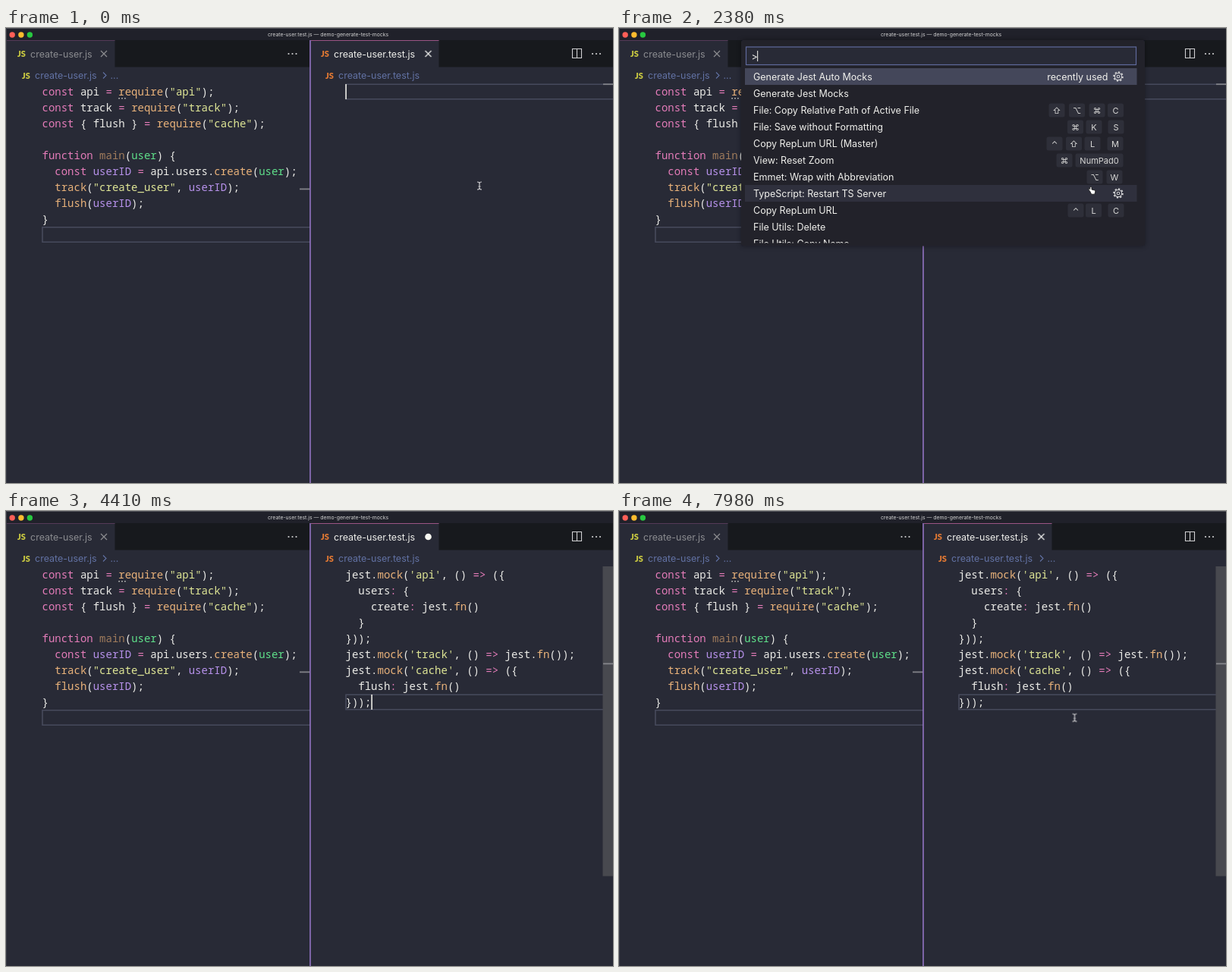
An HTML page for the animation above (8000 ms loop, 800x600 px).

```html
<!DOCTYPE html>
<html lang="en">
<head>
<meta charset="utf-8">
<title>Editor with command palette</title>
<style>
html, body { margin: 0; width: 100%; height: 100%; overflow: hidden; background: #282a36; }
svg { display: block; width: 800px; height: 600px; }
text { font: 12.5px Inter, "DejaVu Sans", sans-serif; fill: #f0f0ec; white-space: pre; }
.code text { font: 14px "Noto Sans Mono", "DejaVu Sans Mono", monospace; fill: #ecece8; }
.title text { font-size: 6.85px; text-anchor: middle; fill: #d4d4d4; }
text.js { font: 900 11px Lato, sans-serif; fill: #cbcb41; }
text.js.test { fill: #e37933; }
text.dim { fill: #8b8c90; }
text.crumb { fill: #6272a4; }
text.key { font-size: 11px; text-anchor: middle; fill: #d8d8d6; }
text.cyan { fill: #8be9fd; }
text.end { text-anchor: end; }
.p { fill: #e47cb9; }
.o { fill: #e9b27a; }
.y { fill: #e0e796; }
.v { fill: #b691ea; }
.g { fill: #5fe08a; }
.m { fill: #a07c5c; }
.line { fill: none; stroke: #474a5c; stroke-width: 1.6; }
.icon { fill: none; stroke: #d0d0d2; stroke-width: 1.1; }
.caret { fill: #d6d6d2; }

/* switches: hard on/off changes on the shared 8 s clock */
.before, .after, .palette, .first, .second, .beam, .hand,
.unsaved, .saved, .symbols, .caret { animation: 8s step-end infinite; }
.before { animation-name: before; }
.after { animation-name: after; }
.palette { animation-name: palette; }
.first { animation-name: first; }
.second { animation-name: second; }
.beam { animation-name: beam; }
.hand { animation-name: hand; }
.unsaved { animation-name: unsaved; }
.saved { animation-name: saved; }
.symbols { animation-name: symbols; }
.blink1 { animation-name: blink1; }
.blink2 { animation-name: blink2; }
.blink3 { animation-name: blink3; }
@keyframes before { 0% { opacity: 1 } 55.1%, 100% { opacity: 0 } }
@keyframes after { 0% { opacity: 0 } 55.1%, 100% { opacity: 1 } }
@keyframes palette { 0%, 55.1%, 100% { opacity: 0 } 29.7% { opacity: 1 } }
@keyframes first { 0% { opacity: 1 } 52.45%, 100% { opacity: 0 } }
@keyframes second { 0% { opacity: 0 } 52.45%, 100% { opacity: 1 } }
@keyframes beam { 0%, 77.85%, 100% { opacity: 1 } 29.7% { opacity: 0 } }
@keyframes hand { 0%, 52.45%, 100% { opacity: 0 } 29.7% { opacity: 1 } }
@keyframes unsaved { 0%, 64.7%, 100% { opacity: 0 } 55.1% { opacity: 1 } }
@keyframes saved { 0%, 64.7%, 100% { opacity: 1 } 55.1% { opacity: 0 } }
@keyframes symbols { 0% { opacity: 0 } 64.7%, 100% { opacity: 1 } }
@keyframes blink1 { 0%, 9.2%, 21.7% { opacity: 1 } 3%, 15.45%, 28%, 100% { opacity: 0 } }
@keyframes blink2 { 0%, 42% { opacity: 1 } 35.8%, 48.1%, 100% { opacity: 0 } }
@keyframes blink3 { 0%, 67.6%, 80.1%, 92.6% { opacity: 1 } 61.35%, 73.85%, 86.35%, 98.85%, 100% { opacity: 0 } }

.mouse { animation: mouse 8s linear infinite; }
@keyframes mouse {
  0%, .875% { transform: translate(624px, 208px); }
  5.25%, 77.875% { transform: translate(622px, 210px); animation-timing-function: ease-in; }
  82.25% { transform: translate(614px, 264px); animation-timing-function: ease-out; }
  87.5%, 91% { transform: translate(604px, 270.5px); }
  99.75%, 100% { transform: translate(600.5px, 272.5px); }
}
</style>
</head>
<body>
<svg viewBox="0 0 800 600" xmlns="http://www.w3.org/2000/svg">
  <defs>
    <g id="gear" class="icon">
      <circle r="4.6"/><circle r="1.8"/>
      <circle r="5.9" stroke-width="1.8" pathLength="16" stroke-dasharray="1 1"/>
    </g>
    <g id="dots" fill="#d0d0d2"><circle cx="-5" r="1.1"/><circle r="1.1"/><circle cx="5" r="1.1"/></g>
    <path id="cross" d="M-4-4L4 4M4-4L-4 4" fill="none" stroke-width="1.2"/>
    <path id="chevron" d="M-2-4L2 0L-2 4" fill="none" stroke="#6272a4" stroke-width="1.1"/>
    <clipPath id="list"><rect x="161" y="53" width="532" height="230.5"/></clipPath>
    <filter id="shadow" x="-10%" y="-10%" width="120%" height="120%">
      <feDropShadow dx="0" dy="0" stdDeviation="3" flood-color="#000" flood-opacity=".4"/>
    </filter>
  </defs>

  <rect width="800" height="600" fill="#282a36"/>

  <g class="title">
    <rect width="800" height="16" fill="#20212a"/>
    <rect width="800" height="1" fill="#505158"/>
    <circle cx="8.2" cy="9" r="3.7" fill="#ff5f57"/>
    <circle cx="19.9" cy="9" r="3.7" fill="#febc2e"/>
    <circle cx="31.4" cy="9" r="3.7" fill="#28c840"/>
    <text x="424.5" y="11.3">create-user.test.js — demo-generate-test-mocks</text>
  </g>

  <!-- tabs -->
  <rect x="143.5" y="16" width="257" height="35.5" fill="#17191d"/>
  <rect x="570.5" y="16" width="230" height="35.5" fill="#17191d"/>
  <rect y="16" width="143.5" height="1" fill="#553a58"/>
  <rect x="402" y="16" width="168.5" height="1" fill="#9a5585"/>
  <text class="js" x="15" y="38">JS</text>
  <text class="dim" x="32" y="38.5">create-user.js</text>
  <use href="#cross" x="129" y="34" stroke="#8b8c90"/>
  <use href="#dots" x="377.5" y="34"/>
  <text class="js test" x="415" y="38">JS</text>
  <text x="432" y="38.5">create-user.test.js</text>
  <use class="saved" href="#cross" x="556.5" y="34" stroke="#f0f0ee"/>
  <circle class="unsaved" cx="556.5" cy="34" r="4.3" fill="#f8f8f2"/>
  <path class="icon" d="M746.5 27.5h12v12h-12zM752.5 27.5v12"/>
  <use href="#dots" x="778" y="34"/>

  <!-- breadcrumbs -->
  <text class="js" x="21" y="66.5">JS</text>
  <text class="crumb" x="38" y="67">create-user.js</text>
  <use href="#chevron" x="130" y="62.5"/>
  <text class="crumb" x="137.5" y="67">...</text>
  <text class="js test" x="421" y="66.5">JS</text>
  <text class="crumb" x="438" y="67">create-user.test.js</text>
  <g class="symbols">
    <use href="#chevron" x="557" y="62.5"/>
    <text class="crumb" x="564.5" y="67">...</text>
  </g>

  <!-- left editor -->
  <path class="line" d="M401 262.8H48V282.3H401"/>
  <rect x="387" y="211.5" width="13.5" height="1.8" fill="#818288"/>
  <g class="code">
    <text x="47.5" y="89"><tspan class="p">const</tspan> api <tspan class="p">=</tspan> <tspan class="o">require</tspan>(<tspan class="y">"api"</tspan>);</text>
    <text x="47.5" y="110"><tspan class="p">const</tspan> track <tspan class="p">=</tspan> <tspan class="o">require</tspan>(<tspan class="y">"track"</tspan>);</text>
    <text x="47.5" y="131"><tspan class="p">const</tspan> { flush } <tspan class="p">=</tspan> <tspan class="o">require</tspan>(<tspan class="y">"cache"</tspan>);</text>
    <text x="47.5" y="173"><tspan class="p">function</tspan> <tspan class="m">main</tspan>(<tspan class="g">user</tspan>) {</text>
    <text x="64.3" y="194"><tspan class="p">const</tspan> <tspan class="v">userID</tspan> <tspan class="p">=</tspan> api.users.<tspan class="o">create</tspan>(<tspan class="g">user</tspan>);</text>
    <text x="64.3" y="215"><tspan class="o">track</tspan>(<tspan class="y">"create_user"</tspan>, <tspan class="v">userID</tspan>);</text>
    <text x="64.3" y="236"><tspan class="o">flush</tspan>(<tspan class="v">userID</tspan>);</text>
    <text x="47.5" y="257">}</text>
  </g>
  <path d="M148.3 92.7h10" stroke="#c4c4c0" stroke-width="1.6" stroke-dasharray="1.6 2.3"/>

  <!-- right editor, empty -->
  <g class="before">
    <path class="line" d="M801 74.2H448V93.7H801"/>
    <rect x="787" y="73.3" width="13" height="1.8" fill="#818288"/>
    <rect class="caret blink1" x="447.2" y="74" width="1.8" height="20"/>
  </g>

  <!-- right editor, generated mocks -->
  <g class="after">
    <path class="line" d="M801 242.2H448V261.7H801"/>
    <rect x="786.5" y="73" width="13.5" height="408.5" fill="#48494f"/>
    <rect x="787" y="200.5" width="13" height="1.8" fill="#85868b"/>
    <g class="code">
      <text x="447.5" y="89">jest.<tspan class="o">mock</tspan>(<tspan class="y">'api'</tspan>, () <tspan class="p">=&gt;</tspan> ({</text>
      <text x="464.3" y="110">users<tspan class="p">:</tspan> {</text>
      <text x="481.1" y="131">create<tspan class="p">:</tspan> jest.<tspan class="o">fn</tspan>()</text>
      <text x="464.3" y="152">}</text>
      <text x="447.5" y="173">}));</text>
      <text x="447.5" y="194">jest.<tspan class="o">mock</tspan>(<tspan class="y">'track'</tspan>, () <tspan class="p">=&gt;</tspan> jest.<tspan class="o">fn</tspan>());</text>
      <text x="447.5" y="215">jest.<tspan class="o">mock</tspan>(<tspan class="y">'cache'</tspan>, () <tspan class="p">=&gt;</tspan> ({</text>
      <text x="464.3" y="236">flush<tspan class="p">:</tspan> jest.<tspan class="o">fn</tspan>()</text>
      <text x="447.5" y="257">}));</text>
    </g>
    <rect class="caret blink3" x="481.2" y="242" width="1.8" height="20"/>
  </g>

  <!-- pane divider and window edge -->
  <rect x="400.2" y="16" width="1.5" height="584" fill="#9a78cc"/>
  <rect width="1" height="600" fill="#3a3c47"/>

  <!-- command palette -->
  <g class="palette">
    <rect x="161" y="16" width="532" height="271.5" rx="3" fill="#21222c" filter="url(#shadow)"/>
    <rect x="167.5" y="25" width="514" height="23.5" fill="#282a36" stroke="#5f6a9c" stroke-width="1.2"/>
    <text x="174.5" y="42">&gt;</text>
    <rect class="caret blink2" x="182" y="30" width="1.2" height="14"/>
    <rect class="first" x="166" y="53" width="516.5" height="22" fill="#44475a"/>
    <rect class="second" x="166" y="75" width="516.5" height="22" fill="#44475a"/>
    <rect x="166" y="207" width="516.5" height="22" fill="#2f303d"/>
    <g id="rows" clip-path="url(#list)"></g>
    <g class="first">
      <text class="end" x="644.5" y="69">recently used</text>
      <use href="#gear" x="658" y="64"/>
    </g>
    <g class="second">
      <text class="end cyan" x="668.5" y="69">recently used</text>
      <use href="#gear" x="658" y="86"/>
      <rect x="677.5" y="53" width="10" height="20.5" fill="#4b4c55"/>
    </g>
    <use href="#gear" x="658" y="218"/>
  </g>

  <g class="mouse">
    <path class="beam" d="M-3-5Q0-5 0-3Q0-5 3-5M0-3V3M-3 5Q0 5 0 3Q0 5 3 5M-1.5 1H1.5" fill="none" stroke="#c9c9cc" stroke-width="1.2"/>
    <path class="hand" d="M-1.2 5.5L-2.8 3.5Q-3-.3-1.2 2.6V0Q0-1.4 1 0V3L5 4Q6 4.4 5.8 6L4.8 9.2H.6Z" fill="#fff" stroke="#111" stroke-width=".8"/>
  </g>
</svg>
<script>
// label, then key caps with their centres
const commands = [
  ["Generate Jest Auto Mocks"],
  ["Generate Jest Mocks"],
  ["File: Copy Relative Path of Active File", "⇧", 577, "⌥", 603.5, "⌘", 630, "C", 654.5],
  ["File: Save without Formatting", "⌘", 601.5, "K", 626, "S", 655],
  ["Copy RepLum URL (Master)", "⌃", 574, "⇧", 599.5, "L", 624, "M", 654],
  ["View: Reset Zoom", "⌘", 587, "NumPad0", 633],
  ["Emmet: Wrap with Abbreviation", "⌥", 627, "W", 653],
  ["TypeScript: Restart TS Server"],
  ["Copy RepLum URL", "⌃", 602, "L", 625.5, "C", 655],
  ["File Utils: Delete"],
  ["File Utils: Copy Name"]
];
const rows = document.getElementById("rows");

function add(tag, attrs, label = "") {
  const el = document.createElementNS("http://www.w3.org/2000/svg", tag);
  for (const name in attrs) el.setAttribute(name, attrs[name]);
  el.textContent = label;
  rows.append(el);
}

commands.forEach(([label, ...keys], i) => {
  const y = 64.5 + 22 * i;
  add("text", { x: 177, y: y + 4.5 }, label);
  for (let k = 0; k < keys.length; k += 2) {
    const cap = keys[k], x = keys[k + 1], width = cap.length > 1 ? 63 : 21;
    add("rect", { x: x - width / 2, y: y - 9, width, height: 18, rx: 2.5, fill: "#2e2f39" });
    add("text", { class: "key", x, y: y + 4 }, cap);
  }
});
</script>
</body>
</html>
```
